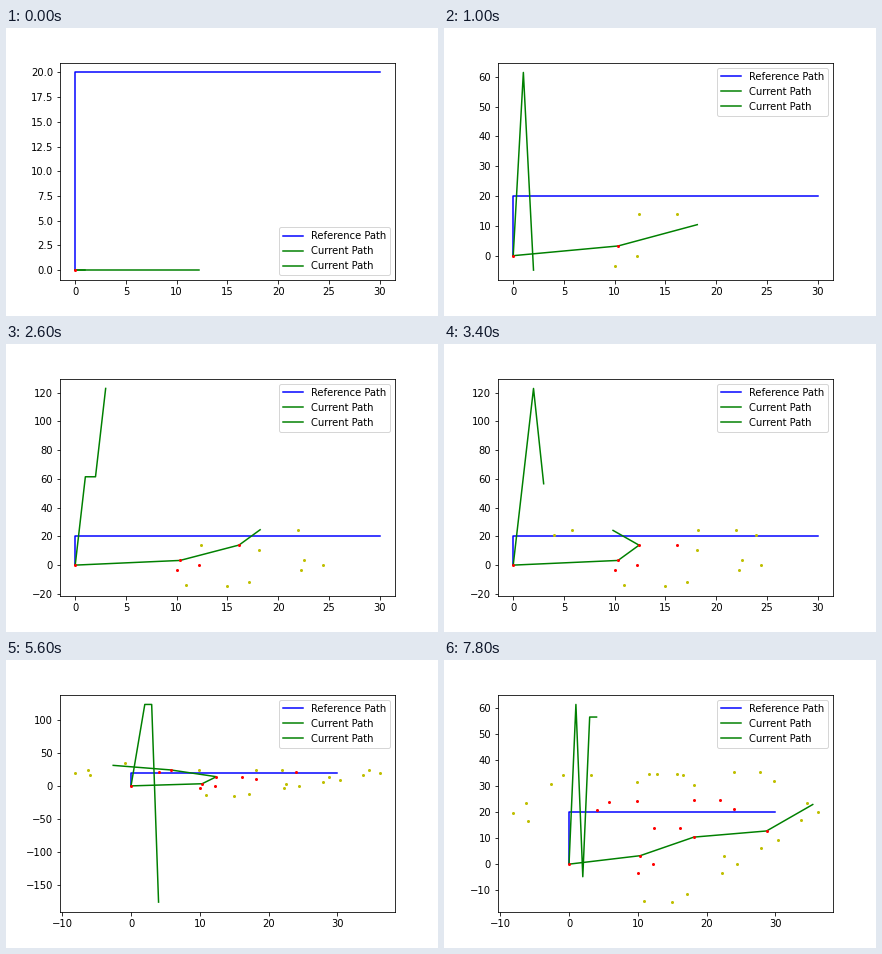
These frames come from a looping animation (432 by 288 pixels, 8000 ms). A matplotlib script:

```python
import numpy as np
import matplotlib.pyplot as plt
from matplotlib.animation import FuncAnimation

plt.rcParams["font.family"] = "DejaVu Sans"
plt.rcParams["font.size"] = 10

# move: forward, sideways, turn in degrees
MOVES = {"S": (12.2, 0, 0), "L": (10.33, 3.25, 61.5), "R": (10.02, -3.45, -66.35)}
# nodes in the order the search expands them, named by their moves
EXPANDED = ["", "L", "R", "S", "LS", "LL", "LLL", "LSR", "LR",
            "LLS", "LLR", "LSL", "LSS", "LRL"]
STEPS = [(i, node + move) for i, node in enumerate(EXPANDED) for move in "SLR"]
FRAMES = 40


def drive(moves):
    """Positions and headings along a chain of moves."""
    x = y = heading = 0.0
    points, headings = [(x, y)], [heading]
    for move in moves:
        ahead, side, turn = MOVES[move]
        c, s = np.cos(np.radians(heading)), np.sin(np.radians(heading))
        x += c * ahead - s * side
        y += s * ahead + c * side
        heading = (heading + turn + 180) % 360 - 180
        points.append((x, y))
        headings.append(heading)
    return np.array(points), headings


def dots(nodes, color):
    if nodes:
        ends = np.array([drive(n)[0][-1] for n in nodes])
        ax.scatter(ends[:, 0], ends[:, 1], s=4, c=color, linewidths=1, zorder=3)


fig, ax = plt.subplots(figsize=(6, 4), dpi=72)
fig.subplots_adjust(left=0.125, right=0.9, bottom=0.125, top=0.88)


def draw(frame):
    ax.clear()
    index, current = STEPS[frame]
    closed = EXPANDED[:index + 1]
    waiting = [n for _, n in STEPS[:frame] if n not in closed]
    points, headings = drive(current)

    ax.plot([0, 0, 30], [0, 20, 20], "b", label="Reference Path")
    ax.plot(points[:, 0], points[:, 1], "g", label="Current Path")
    ax.plot(range(len(headings)), headings, "g", label="Current Path")
    dots(waiting, "y")
    dots(closed, "r")
    ax.legend(loc="best")


anim = FuncAnimation(fig, draw, frames=FRAMES, interval=200,
                     repeat=True, repeat_delay=0)
plt.show()
```
